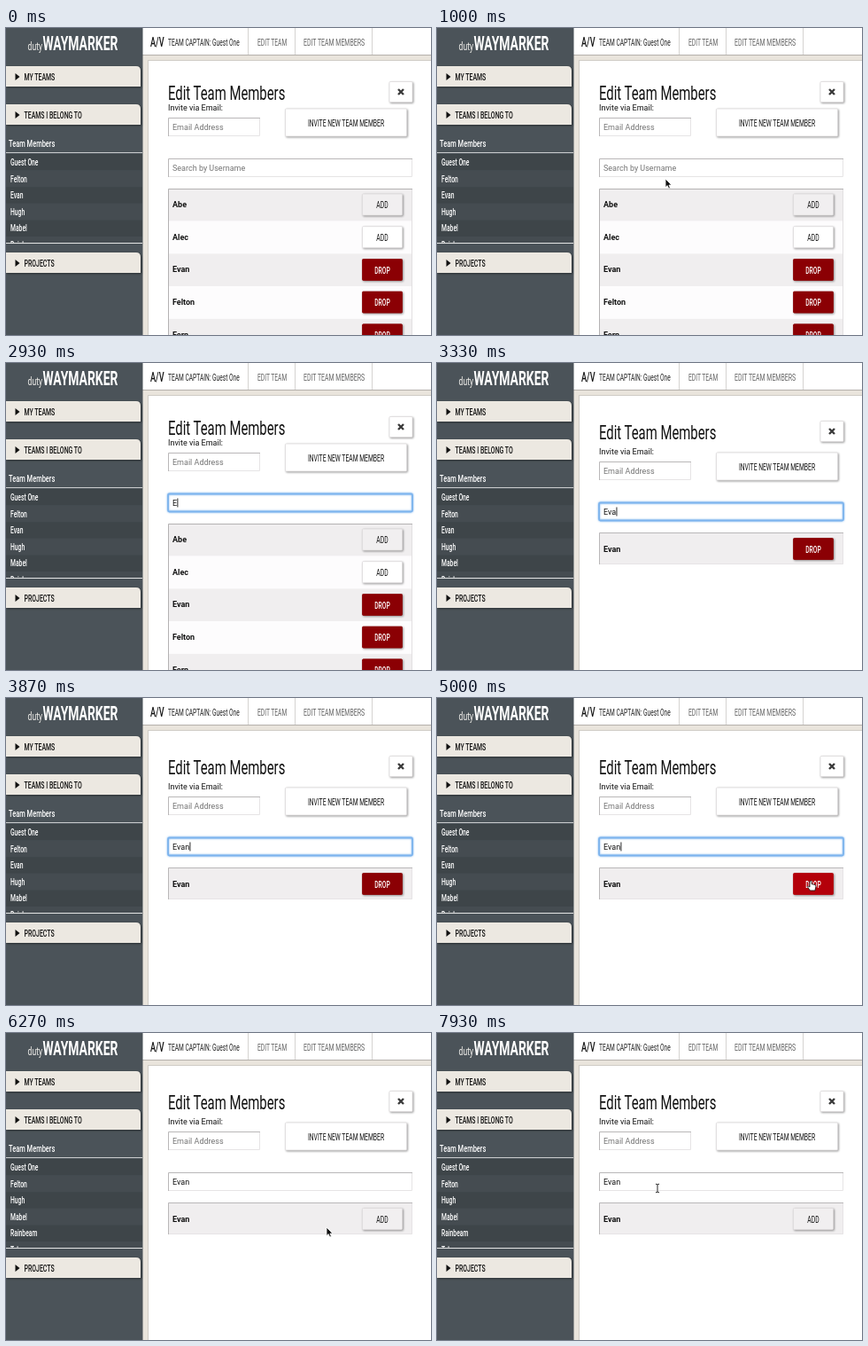
Write an HTML page that moves like this. It is 480 px wide and 346 px high and loops after 8000 ms.

```html
<!DOCTYPE html>
<html lang="en">
<head>
<meta charset="utf-8">
<title>Edit team members</title>
<style>
  html, body { margin: 0; width: 100%; height: 100%; overflow: hidden; background: #fff; }
  svg { display: block; width: 100%; height: 100%; }
  text { font-family: Roboto, Arial, sans-serif; white-space: pre; }
  .raised { filter: drop-shadow(1px 1px 1px rgba(0, 0, 0, .4)); }
  .tab { filter: drop-shadow(1px 1px 1px rgba(0, 0, 0, .45)); }
  .glow { filter: drop-shadow(0 0 1px #7db4ee); }
</style>
</head>
<body>
<svg id="stage" viewBox="0 0 480 346" xmlns="http://www.w3.org/2000/svg"></svg>
<script>
const LOOP = 8000;
const NARROW = 0.65; // one condensed face for all headings and labels
const stage = document.getElementById('stage');
const MEMBER = 'Evan';
const USER = 'Guest One';

function el(parent, tag, attrs = {}, content) {
  const node = document.createElementNS('http://www.w3.org/2000/svg', tag);
  for (const key in attrs) node.setAttribute(key, attrs[key]);
  if (content !== undefined) node.textContent = content;
  return parent.appendChild(node);
}
const group = (parent, attrs) => el(parent, 'g', attrs);
const rect = (parent, x, y, width, height, fill, more) =>
  el(parent, 'rect', { x, y, width, height, fill, ...more });
const line = (parent, d, stroke, width = 1) =>
  el(parent, 'path', { d, stroke, 'stroke-width': width, fill: 'none' });
const plain = (parent, x, y, str, fill = '#111', weight = 400) =>
  el(parent, 'text', { x, y, fill, 'font-size': 9, 'font-weight': weight }, str);
const narrow = (parent, x, y, str, size, fill = '#111', weight = 400, anchor = 'start') =>
  el(parent, 'text', {
    transform: `translate(${x} ${y}) scale(${NARROW} 1)`,
    'font-size': size, fill, 'font-weight': weight, 'text-anchor': anchor
  }, str);
const show = (node, on) => node.setAttribute('display', on ? 'inline' : 'none');
const moveTo = (node, x, y) => node.setAttribute('transform', `translate(${x} ${y})`);

function inset(parent, x, y, w, h, fill) {
  rect(parent, x, y, w, h, fill);
  line(parent, `M${x + w - .5} ${y}V${y + h - .5}H${x}`, '#e6e4e5');
  line(parent, `M${x + .5} ${y + h}V${y + .5}H${x + w}`, '#b9b7b8');
}

function button(parent, x, y, w, h, fill, label, ink = '#111', weight = 400) {
  const g = group(parent);
  const face = rect(g, x + .5, y + .5, w - 1, h - 1, fill,
    { class: 'raised', stroke: ink === '#fff' ? fill : '#dddbdc', 'stroke-width': .8, rx: 1 });
  narrow(g, x + w / 2, y + h / 2 + 4.2, label, 10.4, ink, weight, 'middle');
  return { g, face };
}
const addButton = (parent, y, fill) => button(parent, 402, y, 46, 25, fill, 'ADD');
const dropButton = (parent, y) => button(parent, 402, y, 46, 25, '#8b0004', 'DROP', '#fff', 500);

// Page frame
rect(stage, 0, 0, 480, 346, '#fff');
rect(stage, 154, 31, 326, 315, '#e9e4dc');
line(stage, 'M154 30.5H480', '#b5b1ac');
rect(stage, 160.5, 36.5, 330, 320, '#fff', { stroke: '#d0ccc6', 'stroke-width': 1 });
for (const x of [273.5, 326.5, 413.5]) line(stage, `M${x} 0V30`, '#d5d3d1');
narrow(stage, 163, 21, 'A/V', 14, '#111', 500);
narrow(stage, 183, 20, 'TEAM CAPTAIN: ' + USER, 10.2, '#222');
narrow(stage, 284, 20, 'EDIT TEAM', 10.3, '#666');
narrow(stage, 336, 20, 'EDIT TEAM MEMBERS', 10.7, '#666');

// Sidebar
rect(stage, 0, 0, 154.5, 346, '#4b5359');
narrow(stage, 41, 25, 'duty', 13.2, '#f4f2ee', 400, 'end');
narrow(stage, 41.5, 25, 'WAYMARKER', 21.4, '#fff', 700);

function tab(y, label) {
  el(stage, 'path', { d: `M0 ${y}H147Q152 ${y} 152 ${y + 5}V${y + 23}H0Z`, fill: '#ece8e1', class: 'tab' });
  el(stage, 'path', { d: `M10.5 ${y + 8}L15.5 ${y + 12}L10.5 ${y + 16}Z`, fill: '#111' });
  narrow(stage, 20.5, y + 16, label, 10.7, '#111', 500);
}
tab(43, 'MY TEAMS');
tab(86, 'TEAMS I BELONG TO');
narrow(stage, 3, 134, 'Team Members', 11.5, '#fff', 500);

const clip = el(el(stage, 'defs'), 'clipPath', { id: 'roster' });
rect(clip, 0, 141, 154, 101, '#000');
const roster = group(stage, { 'clip-path': 'url(#roster)' });
const rosterNames = [];
for (let i = 0; i < 6; i++) {
  const y = 142 + i * 18.6;
  rect(roster, 0, y, 154, 18.6, i % 2 ? '#454c51' : '#3e4549');
  rosterNames.push(narrow(roster, 5, y + 13, '', 10.4, '#fff', 500));
}
line(stage, 'M0 140.5H154', '#c9cbcc');
line(stage, 'M0 242.5H154', '#e4e5e5');
tab(253, 'PROJECTS');
const before = [USER, 'Felton', MEMBER, 'Hugh', 'Mabel', 'Rainbeam'];
const after = [USER, 'Felton', 'Hugh', 'Mabel', 'Rainbeam', 'Toby'];

// Title row
const head = group(stage);
narrow(head, 183, 81, 'Edit Team Members', 22.9, '#111', 400);
button(head, 432.5, 60, 27, 24, '#fff', '');
line(head, 'M443 69L449 75M449 69L443 75', '#3a3a3a', 2.4);

// Form
const form = group(stage);
plain(form, 183, 93, 'Invite via Email:');
inset(form, 183, 101, 104, 21, '#fff');
plain(form, 188, 115, 'Email Address', '#757575');
button(form, 315, 90.5, 138, 32, '#fff', 'INVITE NEW TEAM MEMBER');
inset(form, 183, 147, 276, 21, '#fff');
const ring = rect(form, 183, 147.5, 276, 20, 'none',
  { class: 'glow', stroke: '#7db4ee', 'stroke-width': 1.8, rx: 1.5 });
const hint = plain(form, 188, 160.5, 'Search by Username', '#757575');
const query = plain(form, 188, 160.5, '');
const caret = rect(form, 0, 152.5, .9, 10, '#111');

// Full list
const fullList = group(stage);
['Abe', 'Alec', MEMBER, 'Felton', 'Fern'].forEach((name, i) => {
  const y = 181 + i * 36.7;
  rect(fullList, 183, y, 276, 36.7, i % 2 ? '#fdfcfd' : '#f0eeef');
  plain(fullList, 188, y + 21, name, '#111', 700);
  if (i < 2) addButton(fullList, y + 5.5, i ? '#fff' : '#f1eff0');
  else dropButton(fullList, y + 5.5);
});
line(fullList, 'M458.5 181V346', '#e2e0e1');
line(fullList, 'M183.5 346V181.5H459', '#b4b2b3');

// Filtered list
const oneRow = group(stage);
inset(oneRow, 183, 191, 276, 36, '#f0eeef');
plain(oneRow, 188, 212.5, MEMBER, '#111', 700);
const drop = dropButton(oneRow, 197);
const add = addButton(oneRow, 197, '#f1eff0');

// Pointers, each with its hot spot at 0,0
const outlined = (parent, d, fill, stroke) =>
  el(parent, 'path', { d, fill, stroke, 'stroke-width': .8, 'stroke-linejoin': 'round' });
const arrow = group(stage);
outlined(arrow, 'M0 0V9.6L2.2 7.6L3.7 11L5.4 10.3L4 7H7Z', '#111', '#fff');
const hand = group(stage);
outlined(hand, 'M-1 .6Q0 -.8 1 .6V3.6L5 4.6Q6 5 5.8 6.4L5 11H-.6L-3.6 6.8Q-3.4 5.2 -1 7Z', '#fff', '#111');
const beam = group(stage);
for (const [ink, width] of [['#fff', 2], ['#222', 1]])
  line(beam, 'M-2 -4.8Q0 -4.8 0 -3.6Q0 -4.8 2 -4.8M0 -3.6V3.6M-2 4.8Q0 4.8 0 3.6Q0 4.8 2 4.8', ink, width);

// Timeline
const FOCUS = 1450, FILTER = 3130, BLUR = 5330, DROPPED = 5670;
const KEYS = [2800, 3070, 3330, 3600];
const PATH = [ // time, x, y
  [130, 318, 352], [900, 258, 170], [1070, 258, 170], [1330, 256, 158], [2800, 256, 158],
  [3930, 256, 160], [4330, 468, 196], [4730, 422, 206], [5740, 422, 206],
  [6200, 362, 219], [6440, 362, 219], [6870, 309, 200], [7670, 249, 175], [8000, 249, 175]
];

function pointerAt(t) {
  if (t < PATH[0][0] || (t >= KEYS[0] && t < 3930)) return null;
  const i = PATH.findIndex(p => p[0] > t);
  const [t0, x0, y0] = PATH[i - 1], [t1, x1, y1] = PATH[i];
  const u = (t - t0) / (t1 - t0), e = u * u * (3 - 2 * u);
  return { x: x0 + (x1 - x0) * e, y: y0 + (y1 - y0) * e };
}
const inside = (p, x, y, w, h) => p && p.x >= x && p.x <= x + w && p.y >= y && p.y <= y + h;

function draw(t) {
  const filtered = t >= FILTER, dropped = t >= DROPPED;
  const focused = t >= FOCUS && t < BLUR;
  const shift = filtered ? 10 : 0;
  moveTo(head, 0, shift / 2);
  moveTo(form, 0, shift);
  show(fullList, !filtered);
  show(oneRow, filtered);

  const typed = KEYS.filter(k => t >= k);
  query.textContent = MEMBER.slice(0, typed.length);
  show(hint, !typed.length);
  show(ring, focused);
  const lastInput = typed.length ? typed[typed.length - 1] : FOCUS;
  show(caret, focused && (t - lastInput) % 1000 < 500);
  caret.setAttribute('x', 188.3 + (typed.length ? query.getComputedTextLength() : 0));

  const names = dropped ? after : before;
  rosterNames.forEach((node, i) => { node.textContent = names[i]; });

  const p = pointerAt(t);
  const onButton = filtered && inside(p, 402, 197, 46, 25);
  const onSearch = inside(p, 183, 147 + shift, 276, 21);
  show(drop.g, !dropped);
  show(add.g, dropped);
  drop.face.setAttribute('fill', onButton ? '#b4000a' : '#8b0004');
  drop.face.setAttribute('stroke', onButton ? '#b4000a' : '#8b0004');
  show(hand, onButton);
  show(beam, onSearch);
  show(arrow, p && !onButton && !onSearch);
  if (p) for (const node of [arrow, hand, beam]) moveTo(node, p.x, p.y);
}

const start = performance.now();
function tick() {
  draw((performance.now() - start) % LOOP);
  requestAnimationFrame(tick);
}
tick();
</script>
</body>
</html>
```
